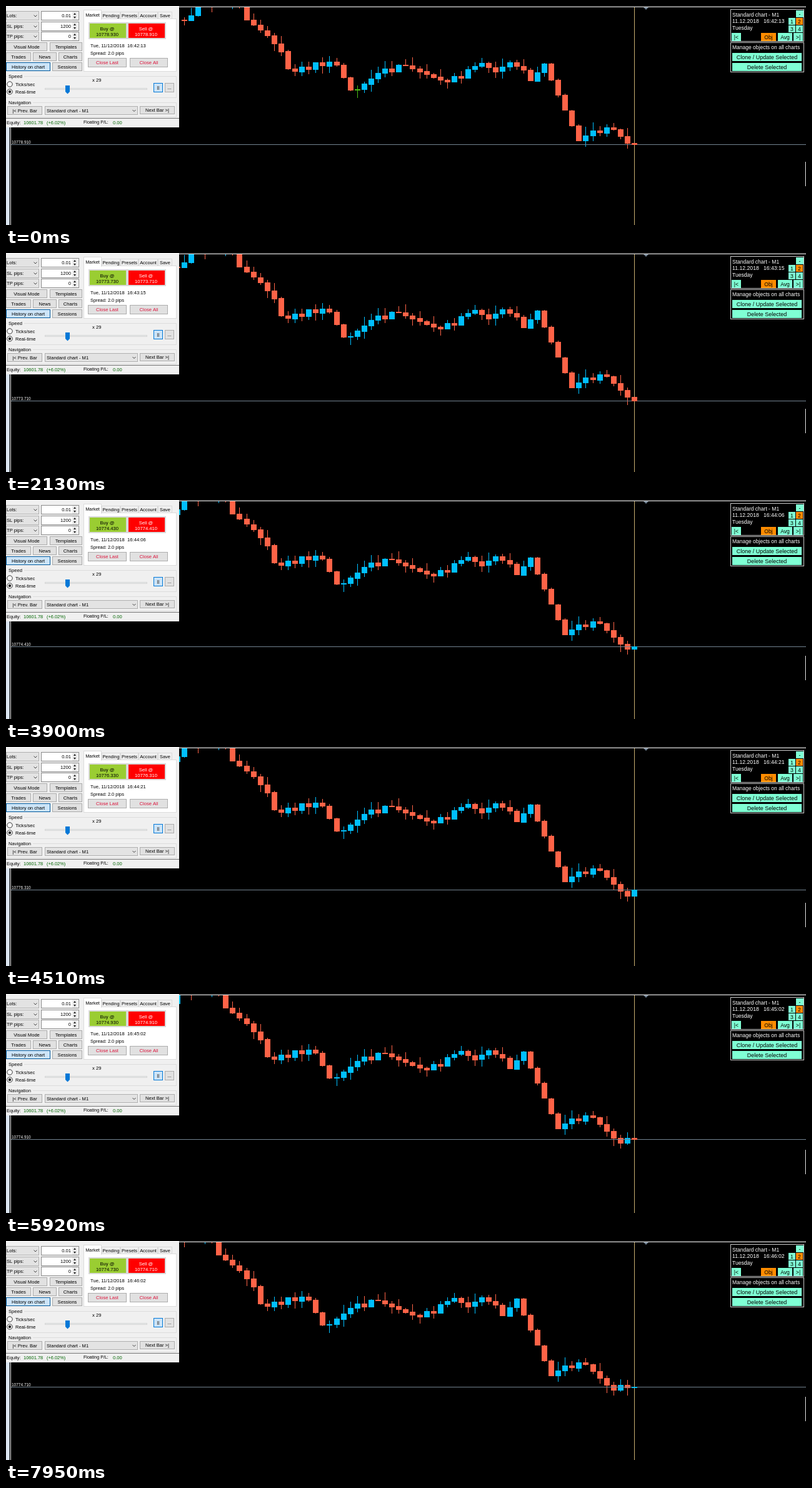
An HTML page with a canvas for the animation above (8 s loop, 1280 px wide and 350 px high).

```html
<!DOCTYPE html>
<html lang="en">
<head>
<meta charset="utf-8">
<title>Chart replay</title>
<style>
  html, body { margin: 0; width: 100%; height: 100%; overflow: hidden; background: #000; }
  canvas { display: block; width: 1280px; height: 350px; }
</style>
</head>
<body>
<canvas id="stage" width="1280" height="350"></canvas>
<script>
const g = document.getElementById('stage').getContext('2d');
const LOOP = 8000, REFRESH = 104;
const PITCH = 11.08, NOW_X = 1005, FIRST_BAR = -9, LIVE_BAR = 56;
const UP = '#00bfff', DOWN = '#ff6347', AQUA = '#7fffd4', ORANGE = '#ff8c00';
const SANS = '"Liberation Sans", Arial, sans-serif';

// Turning points of the closing level: bar, screen height
const turns = [[-10, 22], [-8, 15], [-7, -5], [-1, -5], [0, 22], [3, 47], [5, 72], [6, 100],
  [9, 101], [10, 90], [13, 94], [15, 134], [16, 133], [19, 107], [23, 95], [28, 118], [31, 115],
  [32, 101], [34, 91], [36, 104], [38, 90], [40, 102], [41, 119], [43, 92], [44, 118], [48, 215],
  [50, 199], [53, 197], [56, 230], [57, 238], [58, 230], [60, 230]];

// Replay: milliseconds, seconds after 16:42:00, price above 10770
const replay = [[0, 13, 8.9], [1340, 54, 9.4], [1600, 61, 5.4], [2980, 99, 3.9], [3680, 120, 2.9],
  [3900, 126, 4.4], [5140, 164, 8.9], [5720, 180, 5.4], [6940, 214, 3.7], [7950, 242, 4.7],
  [8054, 245, 4.7]];

const mix = (a, b, u) => a + (b - a) * u;

function rand(i, salt) {
  const v = Math.sin(i * 12.9898 + salt * 78.233) * 43758.5453;
  return v - Math.floor(v);
}

function span(keys, x) {
  const i = keys.findIndex(k => k[0] > x);
  const b = i < 0 ? keys.length - 1 : i;
  return [keys[b - 1], keys[b]];
}

// Bars zigzag where the trend is nearly flat.
function level(bar) {
  const [[i0, y0], [i1, y1]] = span(turns, bar);
  const slope = (y1 - y0) / (i1 - i0);
  const inside = bar > i0 && bar < i1;
  const zigzag = inside && Math.abs(slope) < 4 ? (bar % 2 ? 4 : -4) : 0;
  return y0 + slope * (bar - i0) + zigzag;
}

// Falls sag below the straight line between two keys.
function stateAt(t) {
  const [a, b] = span(replay, t);
  const steps = Math.max(1, Math.round((b[0] - a[0]) / REFRESH));
  const u = Math.floor((t - a[0]) / (b[0] - a[0]) * steps + 1e-6) / steps;
  const sag = b[2] < a[2] ? 1.2 * Math.sin(Math.PI * u) : 0;
  return { sec: Math.floor(mix(a[1], b[1], u) + 1e-6), price: mix(a[2], b[2], u) - sag };
}

function rect(x, y, w, h, fill, edge, line = 1) {
  g.fillStyle = edge || fill;
  g.fillRect(x, y, w, h);
  if (edge) {
    g.fillStyle = fill;
    g.fillRect(x + line, y + line, w - 2 * line, h - 2 * line);
  }
}

function text(s, x, y, color = '#000', size = 7.6, align = 'left') {
  g.font = size + 'px ' + SANS;
  g.fillStyle = color;
  g.textAlign = align;
  g.fillText(s, x, y + size * 0.35);
}

function path(points, color, fill) {
  g.beginPath();
  points.forEach(([x, y]) => g.lineTo(x, y));
  g.fillStyle = g.strokeStyle = color;
  g.lineWidth = 1;
  if (fill) g.fill(); else g.stroke();
}

function disc(x, y, r, fill, edge) {
  g.beginPath();
  g.arc(x, y, r, 0, 7);
  g.fillStyle = fill;
  g.fill();
  if (edge) {
    g.strokeStyle = edge;
    g.lineWidth = 1;
    g.stroke();
  }
}

function button(s, x, y, w, h = 14, color = '#000', fill = '#e1e1e1', edge = '#adadad', size = 7.6) {
  rect(x, y, w, h, fill, edge);
  text(s, x + w / 2, y + h / 2, color, size, 'center');
}

function combo(s, x, y, w, h, tx) {
  const cx = x + w - 6, cy = y + h / 2;
  rect(x, y, w, h, '#e3e3e3', '#b0b0b0');
  text(s, tx, cy);
  path([[cx - 2.5, cy - 1], [cx, cy + 1.5], [cx + 2.5, cy - 1]], '#444');
}

function body(x, open, close, color) {
  rect(x - 4, Math.round(Math.min(open, close)), 9, Math.round(Math.abs(close - open)) + 1, color);
}

function candle(bar, x, color) {
  const open = level(bar - 1), close = level(bar);
  const reach = Math.abs(close - open) > 14 ? 3 : 14;
  const top = Math.min(open, close) - reach * rand(bar, 1);
  const bottom = Math.max(open, close) + reach * rand(bar, 2);
  color = color || (close < open ? UP : DOWN);
  rect(x, Math.round(top), 1, Math.round(bottom - top), color);
  body(x, open, close, color);
}

function drawChart(done, price, quote) {
  const live = LIVE_BAR + done;
  const y = Math.round(220.6 - (price - 8.9) * 2.96);
  rect(0, 0, 1280, 350, '#000');
  for (let bar = FIRST_BAR; bar < live; bar++) {
    const marked = bar === 16 && done === 0;
    candle(bar, Math.round(NOW_X - (live - bar) * PITCH), marked && '#4cbb17');
  }
  rect(8, y, 1272, 1, '#738391');
  rect(NOW_X, 2, 1, 348, '#c9b070');
  const open = level(live - 1);
  body(NOW_X, open, y, y < open ? UP : DOWN);
  text(quote, 9, y - 3.5, '#fff', 6.5);

  rect(276, 0, 1004, 1, '#202020');
  rect(276, 1, 1004, 1, '#e8e8e8');
  path([[1020, 2], [1028, 2], [1024, 6]], '#778899', true);
  rect(1279, 249, 1, 39, '#e8e8e8');
  rect(0, 193, 5, 157, '#dbe5f0');
  rect(5, 193, 1, 157, '#808890');
  rect(7, 193, 1, 157, '#e8e8e8');
}

function drawInfo(time) {
  const key = (s, x, y, w, h, fill = AQUA, size = 8.6) => button(s, x, y, w, h, '#000', fill, fill, size);
  rect(1159, 5, 118, 52, '#000', '#c8c8c8');
  rect(1159, 58, 118, 48, '#000', '#c8c8c8');
  text('Standard chart - M1', 1162, 14, '#fff', 8.5);
  text('11.12.2018', 1162, 24, '#fff', 8.7);
  text(time, 1212, 24, '#fff', 8.6);
  text('Tuesday', 1162, 35, '#fff', 8.6);
  key('-', 1264, 7, 12, 11);
  for (let i = 0; i < 4; i++) {
    key(String(i + 1), 1252 + i % 2 * 12, i < 2 ? 19 : 31, 11, 11, i === 1 ? ORANGE : AQUA);
  }
  key('|<', 1161, 43, 15, 13);
  key('Obj', 1208, 43, 24, 13, ORANGE);
  key('Avg', 1235, 43, 23, 13);
  key('>|', 1260, 43, 15, 13);
  text('Manage objects on all charts', 1162, 66, '#fff', 8.5);
  key('Clone / Update Selected', 1162, 75, 111, 13, AQUA, 9);
  key('Delete Selected', 1162, 91, 111, 13, AQUA, 9);
}

function radio(y, on, label) {
  disc(6, y, 4.2, '#fff', '#333');
  if (on) disc(6, y, 2.2, '#222');
  text(label, 15, y);
}

function group(label, y, h) {
  g.strokeStyle = '#dcdcdc';
  g.lineWidth = 1;
  g.strokeRect(-0.5, y + 0.5, 273, h);
  rect(2, y - 2, g.measureText(label).width + 5, 5, '#f0f0f0');
  text(label, 4, y);
}

function field(label, value, y) {
  combo(label, 0, y, 53, 15, 1);
  rect(56, y, 61, 15, '#fff', '#8a8a8a');
  text(value, 104, y + 7, '#000', 7.6, 'right');
  rect(106, y + 1, 9, 13, '#ececec');
  path([[108, y + 6], [112, y + 6], [110, y + 3]], '#222', true);
  path([[108, y + 9], [112, y + 9], [110, y + 12]], '#222', true);
}

function deal(label, quote, x, fill, color) {
  rect(x, 26, 62, 27, fill, '#d9d9d9', 2);
  text(label, x + 30, 36, color, 7.6, 'center');
  text(quote, x + 30, 45, color, 7.6, 'center');
}

function drawPanel(time, bid, ask) {
  rect(0, 0, 277, 194, '#f0f0f0');
  rect(0, 0, 277, 1, '#fff');
  field('Lots:', '0.01', 8);
  field('SL pips:', '1200', 25);
  field('TP pips:', '0', 41);

  button('Visual Mode', 0, 58, 66);
  button('Templates', 70, 58, 52);
  button('Trades', 0, 74, 40);
  button('News', 43, 74, 38);
  button('Charts', 84, 74, 38);
  button('History on chart', 0, 90, 71, 14, '#000', '#cce4f7', '#005a9e');
  button('Sessions', 74, 90, 48);

  rect(124, 20, 149, 85, '#fff', '#dcdcdc');
  [['Pending', 153, 30], ['Presets', 183, 29], ['Account', 212, 31], ['Save', 243, 23]]
    .forEach(([s, x, w]) => button(s, x, 9, w, 12, '#000', '#f0f0f0', '#dadada', 7.4));
  rect(124, 6, 29, 16, '#fff', '#dcdcdc');
  rect(125, 19, 27, 4, '#fff');
  text('Market', 138.5, 14, '#000', 7.4, 'center');

  deal('Buy @', ask, 132, '#9acd32', '#000');
  deal('Sell @', bid, 194, '#ff0000', '#fff');
  text('Tue, 11/12/2018  ' + time, 135, 63, '#000', 7.65);
  text('Spread: 2.0 pips', 135, 75, '#000', 7.4);
  button('Close Last', 131, 83, 62, 15, '#dc143c');
  button('Close All', 198, 83, 61, 15, '#dc143c');

  group('Speed', 112, 34);
  text('x 29', 138, 118);
  radio(125, false, 'Ticks/sec');
  radio(137, true, 'Real-time');
  rect(62, 131, 164, 3, '#e7eaea', '#d6d6d6');
  path([[95, 127], [102, 127], [102, 137], [98.5, 140.5], [95, 137]], '#0078d7', true);
  rect(236, 123, 15, 15, '#cce4f7', '#0078d7');
  rect(242, 128, 1, 6, '#555');
  rect(244, 128, 1, 6, '#555');
  button('...', 254, 123, 15, 15);

  group('Navigation', 154, 23);
  button('|< Prev. Bar', 2, 160, 56);
  combo('Standard chart - M1', 62, 160, 149, 14, 65);
  button('Next Bar >|', 214, 160, 56, 13);
  rect(0, 179, 277, 1, '#777');
  text('Equity:', 1, 186, '#000', 7.4);
  text('10601.78', 28, 186, '#006400', 7.5);
  text('(+6.02%)', 65, 186, '#006400', 7.4);
  text('Floating P/L:', 124, 186, '#000', 7.1);
  text('0.00', 171, 186, '#006400', 7.6);
}

function draw(t) {
  const { sec, price } = stateAt(t);
  const minute = Math.floor(sec / 60);
  const time = '16:' + (42 + minute) + ':' + String(sec % 60).padStart(2, '0');
  const bid = 10770.01 + Math.round(price * 10) / 10;
  drawChart(minute, price, bid.toFixed(3));
  drawInfo(time);
  drawPanel(time, bid.toFixed(3), (bid + 0.02).toFixed(3));
}

const start = performance.now();
function loop() {
  draw((performance.now() - start) % LOOP);
  requestAnimationFrame(loop);
}
loop();
</script>
</body>
</html>
```
